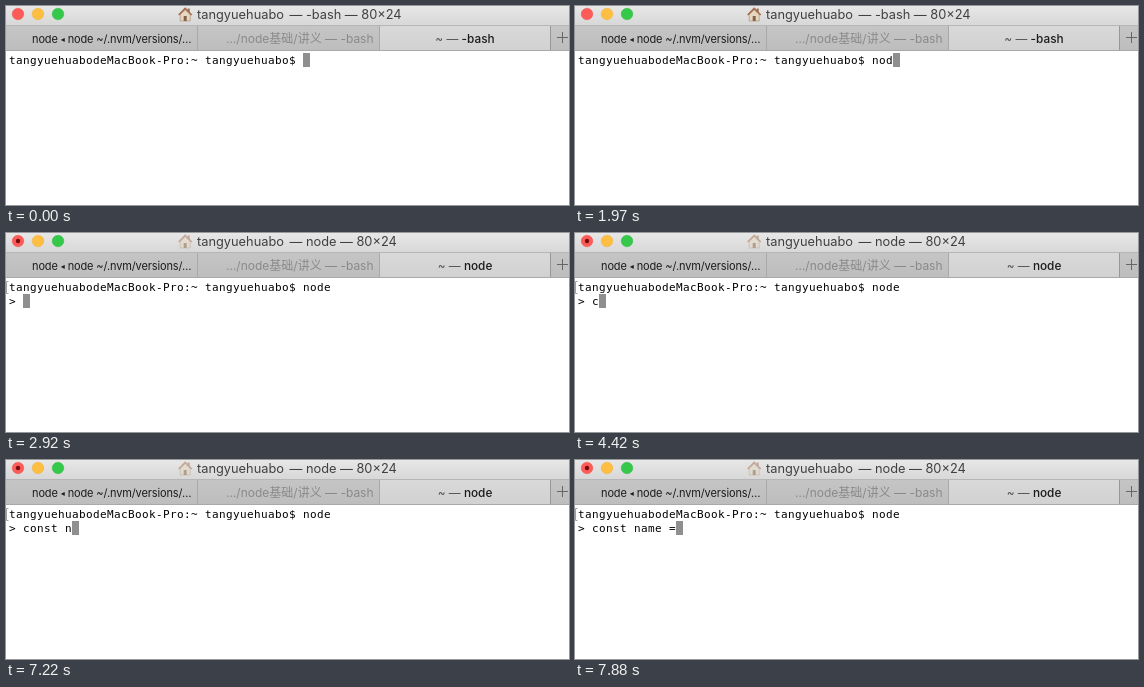
These frames come from a looping animation (563x199 px, 8 s). An HTML page:

```html
<!DOCTYPE html>
<html lang="en">
<head>
<meta charset="utf-8">
<title>Terminal</title>
<style>
  html, body { margin: 0; width: 100%; height: 100%; overflow: hidden; background: #fff; }
  svg { display: block; width: 563px; height: 199px; }
  text { white-space: pre; }
  .title { font: 12.8px Inter, sans-serif; fill: #404040; }
  .tab { font: 11.8px Inter, "Noto Sans CJK SC", sans-serif; fill: #1c1c1c; }
  .tight { font-size: 11px; letter-spacing: -.12px; }
  .small { font-size: 8px; }
  .dim { font-size: 12px; fill: #8a8a8a; }
  .soft { fill: #555; }
  .job { font-weight: 500; }
  .mono { font: 11px "DejaVu Sans Mono", monospace; letter-spacing: .3774px; fill: #000; }
</style>
</head>
<body>
<svg viewBox="0 0 563 199">
  <defs>
    <linearGradient id="bar" x2="0" y2="1">
      <stop stop-color="#e7e7e7"/><stop offset="1" stop-color="#d7d7d7"/>
    </linearGradient>
    <linearGradient id="back" x2="0" y2="1">
      <stop stop-color="#c5c5c5"/><stop offset="1" stop-color="#bdbdbd"/>
    </linearGradient>
    <linearGradient id="front" x2="0" y2="1">
      <stop stop-color="#d9d9d9"/><stop offset="1" stop-color="#d1d1d1"/>
    </linearGradient>
  </defs>
  <rect width="563" height="199" fill="#fff"/>

  <rect width="563" height="20" fill="url(#bar)"/>
  <g stroke-width=".5">
    <circle cx="12" cy="8" r="5.8" fill="#fc5b57" stroke="#ee524e"/>
    <circle cx="32" cy="8" r="5.8" fill="#fdbe41" stroke="#eeb03a"/>
    <circle cx="52" cy="8" r="5.8" fill="#35c84a" stroke="#2eba40"/>
  </g>
  <circle id="busy" cx="12" cy="8" r="2.2" fill="#760c0b"/>
  <g id="home" transform="translate(.7)">
    <path d="M173.500 8.500V15h10V8.500L178.500 4z" fill="#e6d8c0" stroke="#a48b6e" stroke-width=".6"/>
    <path d="M181 2.500h2V6h-2z" fill="#94705a"/>
    <path d="M172 9l6.500-6.500L185 9" fill="none" stroke="#a66a4a" stroke-width="1.6"/>
    <path d="M177 10h3v5h-3z" fill="#85614a"/>
  </g>
  <text class="title" x="191" y="13">tangyuehuabo</text>
  <text class="title" id="title" x="283.500" y="13"></text>

  <rect y="19" width="563" height="26" fill="url(#back)"/>
  <rect x="374" y="19" width="170" height="26" fill="url(#front)"/>
  <path d="M0 19.500H563" stroke="#b6b6b6"/>
  <path d="M0 44.500H563M191.500 20V44M373.500 20V44" stroke="#a9a9a9"/>
  <path d="M544.500 20V44" stroke="#979797"/>
  <path d="M551 31.500H562M556.500 26V37" stroke="#666"/>
  <text class="tab tight" x="26" y="37">node <tspan class="small" dy="-1">◂</tspan><tspan dy="1"> node ~/.nvm/versions/…</tspan></text>
  <text class="tab dim" x="220" y="37">…/node基础/讲义 — -bash</text>
  <text class="tab" y="37" text-anchor="middle" x="459"><tspan class="soft">~ — </tspan><tspan class="job" id="job"></tspan></text>

  <path id="mark" d="M2.500 48.500H.5V60.500H2.500" fill="none" stroke="#a0a0a0"/>
  <rect id="cursor" y="47" width="7" height="14" fill="#8f8f8f"/>
  <text class="mono" id="row0" x="3" y="58"></text>
  <text class="mono" id="row1" x="3" y="72"></text>
</svg>
<script>
const LOOP = 8000, ENTER = 2810, READY = 2920;
const CELL = 7, LINE = 14, LEFT = 3, TOP = 47;
const PROMPT = "tangyuehuabodeMacBook-Pro:~ tangyuehuabo$ ";
const COMMAND = { text: "node", keys: [1320, 1490, 1970, 2510] };
const INPUT = {
  text: "const name =",
  keys: [4420, 4480, 4660, 4760, 4850, 4950, 7220, 7280, 7370, 7460, 7640, 7880]
};
const $ = id => document.getElementById(id);
const typed = ({ text, keys }, t) => text.slice(0, keys.filter(k => k <= t).length);
const show = (id, on) => $(id).setAttribute("visibility", on ? "visible" : "hidden");

function draw(t) {
  const entered = t >= ENTER, ready = t >= READY;
  const rows = [PROMPT + typed(COMMAND, t), ready ? "> " + typed(INPUT, t) : ""];
  const job = ready ? "node" : "-bash";
  const row = entered ? 1 : 0;

  rows.forEach((text, i) => $("row" + i).textContent = text);
  $("cursor").setAttribute("x", LEFT + rows[row].length * CELL);
  $("cursor").setAttribute("y", TOP + row * LINE);
  $("title").textContent = `— ${job} — 80×24`;
  $("job").textContent = job;
  $("home").setAttribute("opacity", ready ? .5 : 1);
  show("busy", ready);
  show("mark", entered);
}

const start = performance.now();
function tick() {
  draw((performance.now() - start) % LOOP);
  requestAnimationFrame(tick);
}
draw(0);
requestAnimationFrame(tick);
</script>
</body>
</html>
```
